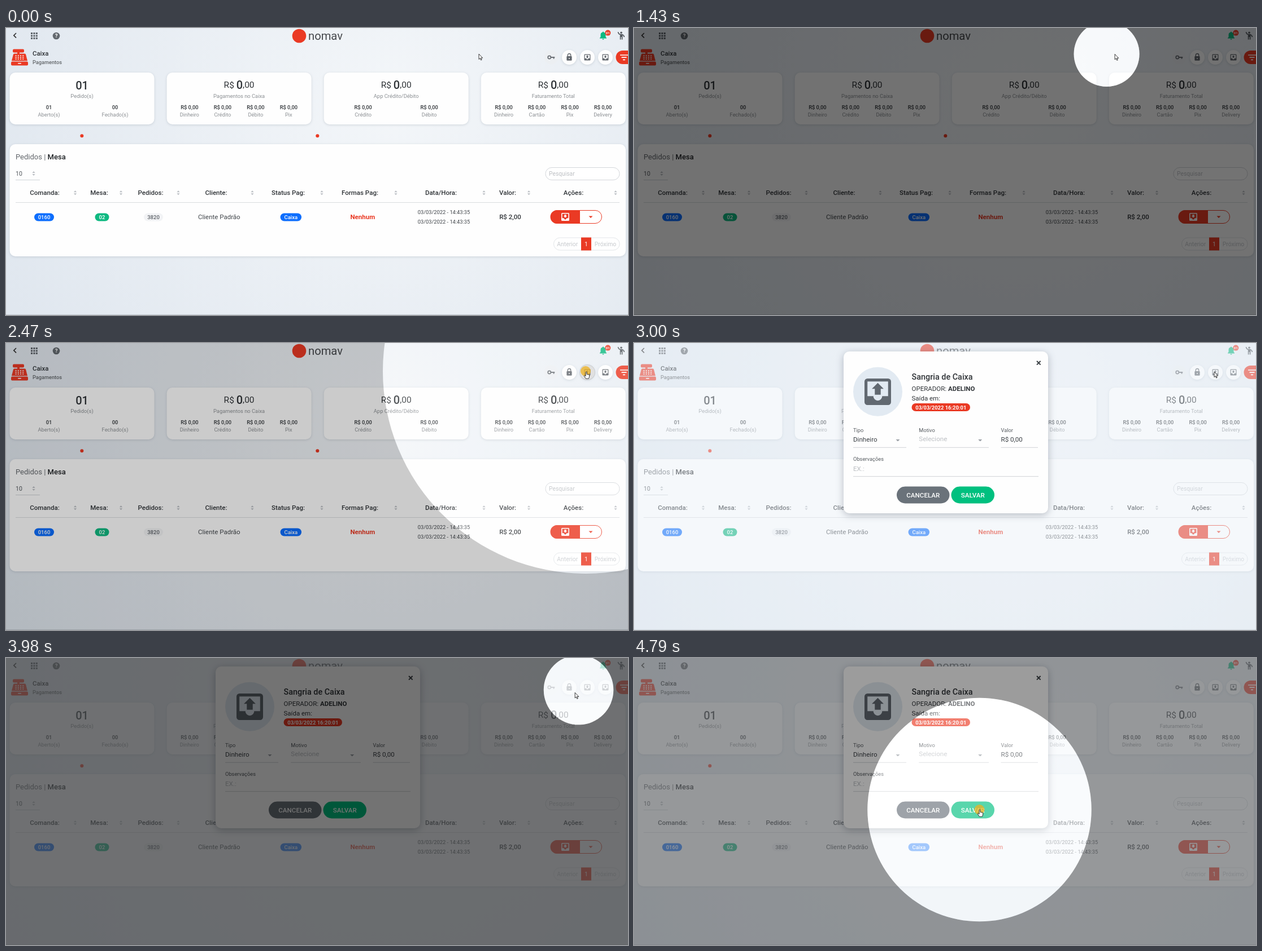
Write an HTML page that moves like this. It is 1101 px wide and 509 px high and loops after 4.87 s.

```html
<!DOCTYPE html>
<html lang="pt-BR">
<head>
<meta charset="utf-8">
<title>Caixa</title>
<style>
  html, body { margin: 0; width: 100%; height: 100%; overflow: hidden; }
  svg { display: block; font-family: Roboto, sans-serif; }
  .card { fill: #fefefe; filter: drop-shadow(0 1px 2px rgba(60, 75, 95, .18)); }
  #modal > .card { filter: drop-shadow(0 3px 7px rgba(40, 50, 70, .3)); }
</style>
</head>
<body>
<svg id="stage" width="1101" height="509" viewBox="0 0 1101 509"></svg>
<script>
const RED = '#ea3a24', INK = '#2f3337', GREY = '#8b8f93', PALE = '#bcbfc3', BLUE = '#0d6efd', GREEN = '#10b981';
const DAY = '03/03/2022';

// Markup helpers
const text = (x, y, s, size, fill = INK, weight = 400, anchor = 'middle') =>
  `<text x="${x}" y="${y}" font-size="${size}" fill="${fill}" font-weight="${weight}" text-anchor="${anchor}">${s}</text>`;
const left = (x, y, s, size, fill, weight) => text(x, y, s, size, fill, weight, 'start');
const rect = (x, y, w, h, r, fill, extra = '') =>
  `<rect x="${x}" y="${y}" width="${w}" height="${h}" rx="${r}" fill="${fill}" ${extra}/>`;
const card = (x, y, w, h) => rect(x, y, w, h, 10, '#fefefe', 'class="card"');
const dot = (x, y, r, fill, extra = '') => `<circle cx="${x}" cy="${y}" r="${r}" fill="${fill}" ${extra}/>`;
const path = (d, fill, extra = '') => `<path d="${d}" fill="${fill}" ${extra}/>`;
const line = (x1, x2, y, color = '#d9dcdf') => path(`M${x1} ${y}H${x2}`, 'none', `stroke="${color}"`);
const pill = (cx, w, s, fill, color = '#fff') =>
  rect(cx - w / 2, 328.5, w, 14, 7, fill) + text(cx, 338.9, s, 9.5, color, 500);
const sorter = (x, y) => path(`M${x - 2.6} ${y - 1}h5.2l-2.6-3zM${x - 2.6} ${y + 1}h5.2l-2.6 3z`, '#b9bdc2');
const caret = (x, y, fill) => path(`M${x - 3.5} ${y}h7l-3.5 3.5z`, fill);
const tray = (cx, cy, size, fill, up) => {
  const arrow = up ? 'M8 10h2v4h4v-4h2l-4-4z' : 'M16 10h-2V7h-4v3H8l4 4z';
  return `<g transform="translate(${cx} ${cy}) scale(${size / 18}) translate(-12 -12)">` +
    path('M19 3H5a2 2 0 0 0-2 2v14a2 2 0 0 0 2 2h14a2 2 0 0 0 2-2V5a2 2 0 0 0-2-2zm0 12h-4a3 3 0 0 1-6 0H5V5h14z' + arrow,
      fill, 'fill-rule="evenodd"') + '</g>';
};

function header() {
  let s = path('M18 9l-4.2 4.2 4.2 4.2', 'none', 'stroke="#333" stroke-width="1.7"');
  for (let i = 0; i < 9; i++) s += rect(44 + i % 3 * 4.4, 8 + (i / 3 | 0) * 4.4, 3, 3, 0, '#5c6268');
  s += dot(89, 14, 6.3, '#63696f') + text(89, 17.4, '?', 9.5, '#fff', 700);
  s += dot(519, 14, 12.3, RED) + left(535, 21, 'nomav', 20.2, '#45484c');
  // Bell, badge and waving figure
  s += path('M1051 18.5v-1l1.5-1.5v-4a4.6 4.6 0 0 1 3.4-4.5a1.1 1.1 0 0 1 2.2 0a4.6 4.6 0 0 1 3.4 4.5v4l1.5 1.5v1zM1055.5 19.3h3a1.5 1.5 0 0 1-3 0z', GREEN);
  s += dot(1065.3, 8.6, 5, RED) + text(1065.3, 10.8, '01', 6, '#fff', 700);
  s += dot(1089, 8.3, 1.8, '#555b61') +
    path('M1083.5 7q.5 4 4 4.5h3q3 .8 4 4.5M1087.6 11.5v9M1090.6 11.5v9M1089 11v5', 'none', 'stroke="#555b61" stroke-width="1.7"');
  // Cash register
  s += rect(12, 37.5, 20, 6, 2, RED) + rect(20, 43, 4, 4, 0, RED) +
    path('M14.5 45.5h19q1.2 0 1.6 1.5l2.9 11.3H10l2.9-11.3q.4-1.5 1.6-1.5z', RED) + rect(9, 59.5, 30, 7, 2, RED);
  for (let i = 0; i < 12; i++) s += rect(16.5 + i % 4 * 4.2, 48.3 + (i / 4 | 0) * 3, 2.2, 1.5, .5, '#fff');
  s += rect(21, 62, 6, 1.6, .8, '#fff');
  s += left(47, 49, 'Caixa', 11.4, INK, 500) + left(47, 64, 'Pagamentos', 9.2, '#62666a', 500);
  // Round buttons
  s += dot(965, 52, 12.5, '#eceff2');
  for (const x of [997, 1029, 1061]) s += dot(x, 52, 13, '#fff', 'class="card"');
  s += dot(961.8, 52, 2.6, 'none', 'stroke="#6a6f75" stroke-width="1.7"') +
    path('M964.5 52h6.8M969.6 52v2.8', 'none', 'stroke="#6a6f75" stroke-width="1.8"');
  s += rect(992.4, 50, 9.2, 7.8, 1.2, '#62676d') +
    path('M994.3 50v-1.8a2.7 2.7 0 0 1 5.4 0V50', 'none', 'stroke="#62676d" stroke-width="1.4"') + dot(997, 54, 1, '#fff');
  s += tray(1029, 52, 11, '#62676d', true) + tray(1061, 52, 11, '#62676d');
  s += rect(1079.5, 40, 40, 24, 12, RED) +
    path('M1087 48h14M1089.5 52.2h9M1092 56.4h4', 'none', 'stroke="#fff" stroke-width="1.7"');
  return s;
}

function summary(i, label, cols) {
  const x = 6.5 + i * 278.1, cx = x + 128;
  let s = card(x, 79, 256, 92);
  s += i
    ? text(cx, 106, 'R$ <tspan dy="2" font-size="20" font-weight="500">0</tspan><tspan dy="-2">,00</tspan>', 15.5)
    : text(cx, 108.5, '01', 20, INK, 500);
  s += text(cx, 124.3, label, 9.4, GREY);
  cols.forEach((name, c) => {
    const px = x + 11 + (c + .5) * 234 / cols.length;
    s += text(px, 143.5, i ? 'R$ 0,00' : ['01', '00'][c], 9.3, INK, 500) + text(px, 156.7, name, 9.3, GREY);
  });
  return s;
}

function table() {
  let s = card(6.5, 206, 1090.5, 199);
  s += left(17, 233, `Pedidos | <tspan fill="#1d2023" font-weight="500">Mesa</tspan>`, 13, '#62666b');
  s += left(17, 262, '10', 10.5, '#50555a') + sorter(49, 258) + line(17, 60, 269.5, '#cfd3d7');
  s += rect(955, 247.5, 131, 22, 11, '#fff', 'stroke="#d3d6da"') + left(961, 262.2, 'Pesquisar', 10.3, PALE);
  const heads = [['Comanda:', 68.5, 122.5], ['Mesa:', 165, 203.5], ['Pedidos:', 256, 305], ['Cliente:', 372, 436],
    ['Status Pag:', 499.5, 559], ['Formas Pag:', 626.5, 690], ['Data/Hora:', 770, 846], ['Valor:', 888, 925.5], ['Ações:', 1004.5, 1079]];
  for (const [name, x, sx] of heads) s += text(x, 296, name, 11.5, INK, 500) + sorter(sx, 292.3);
  s += line(17, 1086, 309.5);
  s += pill(67.5, 35, '0160', BLUE) + pill(170, 25, '02', GREEN) + pill(261, 34, '3820', '#f2f3f5', '#5b6066');
  s += text(377.3, 338.8, 'Cliente Padrão', 11.5, '#40454a') + pill(504.3, 37.5, 'Caixa', BLUE);
  s += text(631.3, 338.8, 'Nenhum', 11.5, RED, 700);
  for (const y of [330, 346.8]) s += text(775, y, DAY + ' - 14:43:35', 9.3, '#40454a');
  s += text(892.5, 338.8, 'R$ 2,00', 11.5, INK, 500);
  s += rect(964.5, 323.5, 90, 23, 11.5, '#fff', `stroke="${RED}"`) +
    path('M1016 323v24h-40.5a12 12 0 0 1 0-24z', RED) + tray(990, 335, 14, '#fff') + caret(1035, 333.5, RED);
  s += rect(969.5, 372, 116.5, 22, 11, '#fff', 'stroke="#e2e5e8"') + rect(1018, 371.5, 18, 23, 0, RED);
  s += text(993.7, 386.7, 'Anterior', 10.4, '#c6c9cd') + text(1027, 386.7, '1', 10.4, '#fff') + text(1061, 386.7, 'Próximo', 10.4, '#c6c9cd');
  return s;
}

function modal() {
  let s = card(371, 15, 362, 287);
  s += path('M713 32l6.6 6.6M719.6 32l-6.6 6.6', 'none', 'stroke="#3c4146" stroke-width="2"');
  s += dot(431.5, 86.3, 43.5, '#e2eaf2') + tray(431.5, 86.5, 47, '#626971', true);
  s += left(491.5, 64.5, 'Sangria de Caixa', 14.4, INK, 500);
  s += left(491.5, 85.3, 'OPERADOR: <tspan font-weight="700">ADELINO</tspan>', 11.5) + left(491.5, 101.6, 'Saída em:', 11.5);
  s += rect(491.5, 107, 103.5, 14, 7, RED) + text(543.3, 117.5, DAY + ' 16:20:01', 9.4, '#fff', 700);
  const fields = [[388, 482, 158, 'Tipo', 'Dinheiro', 175], [504.3, 628, 158, 'Motivo', 'Selecione', 173.8],
    [649.5, 715, 158, 'Valor', 'R$ 0,00', 175], [388, 716, 209, 'Observações', 'EX.:', 227]];
  for (const [x, end, y, label, value, vy] of fields) {
    const hint = value[0] == 'S' || value[0] == 'E';
    s += left(x, y, label, 9.3, '#565b60') + left(x, vy, value, 11.6, hint ? PALE : '#3a3f44') +
      line(x, end, y == 158 ? 185.3 : 236.7, '#cfd2d6');
  }
  s += caret(467, 171, '#9a9fa5') + caret(612.7, 171, '#9a9fa5');
  s += rect(465, 254.5, 93.5, 30, 15, '#6a727a') + text(511.8, 273.7, 'CANCELAR', 11.6, '#fff', 500);
  s += rect(561.5, 254.5, 76.5, 30, 15, '#00c07f') + text(599.8, 273.7, 'SALVAR', 11.6, '#fff', 500);
  return s;
}

const stage = document.getElementById('stage');
stage.innerHTML = `
  <defs><radialGradient id="sky" gradientUnits="userSpaceOnUse" cx="680" cy="130" r="760">
    <stop offset="0" stop-color="#f3f6f9"/><stop offset="1" stop-color="#e0e7ef"/></radialGradient></defs>` +
  rect(0, 0, 1101, 509, 0, 'url(#sky)') + header() +
  summary(0, 'Pedido(s)', ['Aberto(s)', 'Fechado(s)']) +
  summary(1, 'Pagamentos no Caixa', ['Dinheiro', 'Crédito', 'Débito', 'Pix']) +
  summary(2, 'App Crédito/Débito', ['Crédito', 'Débito']) +
  summary(3, 'Faturamento Total', ['Dinheiro', 'Cartão', 'Pix', 'Delivery']) +
  dot(134.3, 191.3, 3, RED) + dot(551.3, 191.3, 3, RED) + table() + line(0, 1101, 508.5, '#c3cad1') +
  dot(1029, 52, 14, '#000', 'id="hover" opacity=".14"') +
  rect(0, 0, 1101, 509, 0, '#e9eff6', 'id="veil"') +
  `<g id="modal">${modal()}</g>` +
  path('', '#000', 'id="dim" fill-rule="evenodd"') + dot(0, 0, 0, '#fff', 'id="wash"') +
  dot(0, 0, 9, '#eeb120', 'id="click"') +
  `<g id="cursor" stroke="#222" stroke-width=".9" stroke-linejoin="round">` +
  path('M0 0v9.6l2.2-2 1.5 3.4 1.5-.7-1.5-3.2h3z', '#fff', 'id="arrow"') +
  path('M-.9 1a1 1 0 0 1 2 0v3.4l3.2.6q1.6.4 1.5 2l-.6 3.2-.8 2H-.6l-3-4.4q-.3-1.4 1-1.2l1.7 1.4z', '#fff', 'id="hand"') + '</g>';

const $ = id => document.getElementById(id);
const ramp = (t, start, span) => Math.min(1, Math.max(0, (t - start) / span));
const ease = (t, start, span) => (1 - Math.cos(Math.PI * ramp(t, start, span))) / 2;
const set = (id, attrs) => { for (const k in attrs) $(id).setAttribute(k, attrs[k]); };
const LOOP = 4870, SPAN = 505, WIDE = 530, TIGHT = 58;

function draw(t) {
  // Spotlight: closes before each cursor trip, opens on each click
  const focus = ramp(t, 722, SPAN) - ramp(t, 2149, SPAN) + ramp(t, 3480, SPAN) - ramp(t, 4641, SPAN);
  const r = WIDE - (WIDE - TIGHT) * focus, dark = .55 * focus;
  const a = ease(t, 1403, 775), b = ease(t, 3895, 775);
  const sx = 836 + 190 * a - 414.5 * b, sy = 46 + 4 * a + 219 * b;
  set('dim', { d: `M0 0H1101V509H0zM${sx - r} ${sy}a${r} ${r} 0 1 0 ${2 * r} 0a${r} ${r} 0 1 0 ${-2 * r} 0z`, opacity: dark });
  set('wash', { cx: sx, cy: sy, r, opacity: dark * .9 });

  // The cursor runs slightly ahead of the spotlight
  const c = ease(t, 1322, 620), d = ease(t, 3880, 720);
  const x = 837 + 190 * c - 415 * d, y = 46 + 5 * c + 218 * d;
  const onTray = t > 1850 && t < 2660 && x > 1016, onSave = x < 638 && y > 254;
  const hand = onTray || onSave;
  set('cursor', { transform: `translate(${x} ${y})` });
  set('arrow', { visibility: hand ? 'hidden' : 'visible' });
  set('hand', { visibility: hand ? 'visible' : 'hidden' });
  set('hover', { visibility: onTray ? 'visible' : 'hidden' });
  const click = ramp(t, 2110, 40) - ramp(t, 2500, 120) + ramp(t, 4620, 40);
  set('click', { cx: sx, cy: sy, opacity: .75 * click });

  // Dialog drops in
  const drop = 1 - (1 - ramp(t, 2680, 300)) ** 2;
  set('veil', { opacity: .46 * ramp(t, 2655, 150) });
  set('modal', { opacity: drop, transform: `translate(0 ${-50 * (1 - drop)})`, visibility: drop ? 'visible' : 'hidden' });
}

const t0 = performance.now();
function tick() {
  draw((performance.now() - t0) % LOOP);
  requestAnimationFrame(tick);
}
tick();
</script>
</body>
</html>
```
